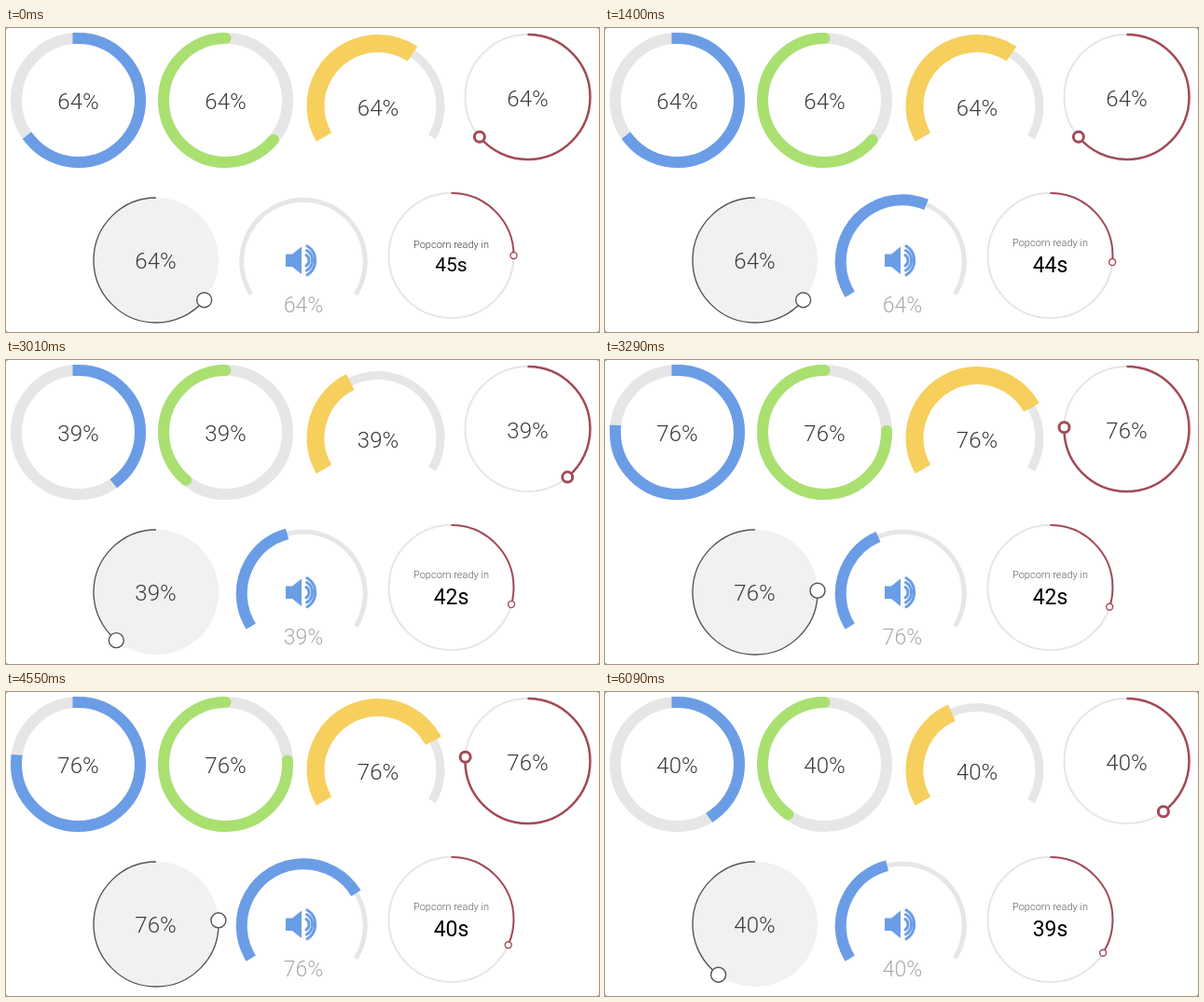
An HTML page for the animation above (6.16 s loop, 636 by 326 pixels).

```html
<!DOCTYPE html>
<html lang="en">
<head>
<meta charset="utf-8">
<title>Circular progress bars</title>
<style>
  html, body { margin: 0; width: 100%; height: 100%; overflow: hidden; background: #999; }
  svg { display: block; width: 636px; height: 326px; background: #fff; border-radius: 3px; }
  path, circle { fill: none; }
  text { font-family: Roboto, sans-serif; font-weight: 300; text-anchor: middle; fill: #3c3c3c; }
  .pct { font-size: 24px; }
  .track { stroke: #e6e6e6; }
  .knob { fill: #fff; }
</style>
</head>
<body>
<svg id="stage" viewBox="0 0 636 326">
  <circle cx="161" cy="249" r="67" style="fill:#f1f1f1"/>
  <g id="bars"></g>
  <g id="icon" stroke="#6a9de6" stroke-width="3" stroke-linecap="round">
    <path d="M300 242.5h7l10-8v29.500l-10-8h-7z" stroke="none" style="fill:#6a9de6"/>
    <path d="M322 243.500a7 7 0 0 1 0 11.500"/>
    <path d="M322.500 238.500a12.500 12.500 0 0 1 0 21.500"/>
    <path d="M323 233.800a18.200 18.200 0 0 1 0 31"/>
  </g>
  <text class="pct" x="77.500" y="87">64%</text>
  <text class="pct" x="235.500" y="87">64%</text>
  <text class="pct" x="399" y="94">64%</text>
  <text class="pct" x="559.500" y="84">64%</text>
  <text class="pct" x="160.500" y="258">64%</text>
  <text class="pct" x="319" y="305" style="font-size:23px;fill:#aaa">64%</text>
  <text id="label" x="477.500" y="234" font-size="11">Popcorn ready in</text>
  <text id="left" x="477.500" y="262" style="font-weight:400;fill:#000">45s</text>
</svg>
<script>
const LOOP = 6160;
const RED = '#a34a57';
const $ = id => document.getElementById(id);

// Each step: start, duration, new value
const percent = { from: 64, steps: [[1620, 300, 39], [3040, 300, 76], [4655, 300, 40]] };
const volume = { from: 0, steps: [[395, 1500, 64], [2250, 1500, 39], [3490, 1500, 76], [5190, 1500, 40]] };
const ticks = [395, 1405, 2405, 3510, 4490, 5520];
const timer = { from: 25, steps: ticks.map((t, i) => [t + 500, 300, (16 + i) / 0.6]) };

const bars = [
  { x: 77.5, y: 77.5, r: 66.5, w: 12, track: 12, color: '#6a9de6', cap: 'square' },
  { x: 235.5, y: 77.5, r: 66.5, w: 12, track: 12, color: '#a9e070', cap: 'round', dir: -1 },
  { x: 399, y: 83.5, r: 67, w: 19, track: 9, color: '#f6cf5d', half: 120 },
  { x: 559.5, y: 74, r: 67, w: 2.5, track: 2, color: RED, knob: 5.5, ring: 3 },
  { x: 161, y: 249, r: 67, w: 1.4, track: 0, color: '#555', dir: -1, knob: 8, ring: 1.4 },
  { x: 319, y: 250.5, r: 66.3, w: 12, track: 5, color: '#6a9de6', half: 122, value: volume },
  { x: 477.5, y: 244, r: 67, w: 2, track: 2, color: RED, knob: 3.5, ring: 1.4, value: timer }
];

function add(tag, attrs) {
  const el = document.createElementNS('http://www.w3.org/2000/svg', tag);
  for (const k in attrs) el.setAttribute(k, attrs[k]);
  return $('bars').appendChild(el);
}

function point({ x, y, r, half = 180, dir = 1 }, p) {
  const start = half === 180 ? 0 : -half;
  const a = (start + dir * p * half / 50) * Math.PI / 180;
  return [x + r * Math.sin(a), y - r * Math.cos(a)];
}

function arc(bar) {
  const flag = bar.dir === -1 ? 0 : 1;
  const to = p => `A${bar.r} ${bar.r} 0 0 ${flag} ${point(bar, p)}`;
  return `M${point(bar, 0)}${to(50)}${to(100)}`;
}

for (const bar of bars) {
  const d = arc(bar);
  if (bar.track) add('path', { d, class: 'track', 'stroke-width': bar.track });
  bar.line = add('path', {
    d, pathLength: 100, stroke: bar.color,
    'stroke-width': bar.w, 'stroke-linecap': bar.cap || 'butt'
  });
  if (bar.knob) {
    bar.dot = add('circle', { class: 'knob', r: bar.knob, stroke: bar.color, 'stroke-width': bar.ring });
  }
}

// cubic-bezier(.25, .1, .25, 1)
function ease(x) {
  if (x >= 1) return 1;
  const curve = (a, b, s) => 3 * a * s * (1 - s) ** 2 + 3 * b * s * s * (1 - s) + s ** 3;
  let lo = 0, hi = 1;
  for (let i = 0; i < 24; i++) {
    const mid = (lo + hi) / 2;
    if (curve(0.25, 0.25, mid) < x) lo = mid; else hi = mid;
  }
  return curve(0.1, 1, lo);
}

function valueAt({ from, steps }, t) {
  return steps.reduce((v, [start, time, to]) => t > start ? v + (to - v) * ease((t - start) / time) : v, from);
}

function targetAt({ from, steps }, t) {
  return steps.reduce((v, [start, , to]) => t >= start ? to : v, from);
}

const numbers = document.querySelectorAll('.pct');

function draw(now) {
  const t = now % LOOP;
  for (const bar of bars) {
    const p = valueAt(bar.value || percent, t);
    bar.line.setAttribute('stroke-dasharray', `${p} 200`);
    bar.line.style.visibility = p > 0 ? 'visible' : 'hidden';
    if (bar.dot) {
      const [x, y] = point(bar, p);
      bar.dot.setAttribute('cx', x);
      bar.dot.setAttribute('cy', y);
    }
  }
  const shown = targetAt(percent, t) + '%';
  numbers.forEach(n => { n.textContent = shown; });
  $('left').textContent = 45 - ticks.filter(s => t >= s).length + 's';

  // The timer caption settles at the start
  const k = Math.min(1, Math.max(0, t / 210));
  const grey = 60 + 35 * k;
  $('label').setAttribute('y', 236 - 2 * k);
  $('label').style.fill = `rgb(${grey},${grey},${grey})`;
  $('left').setAttribute('y', 260.5 + 1.5 * k);
  $('left').setAttribute('font-size', 21 + 2 * k);
}

function frame() {
  draw(performance.now());
  requestAnimationFrame(frame);
}
frame();
</script>
</body>
</html>
```
